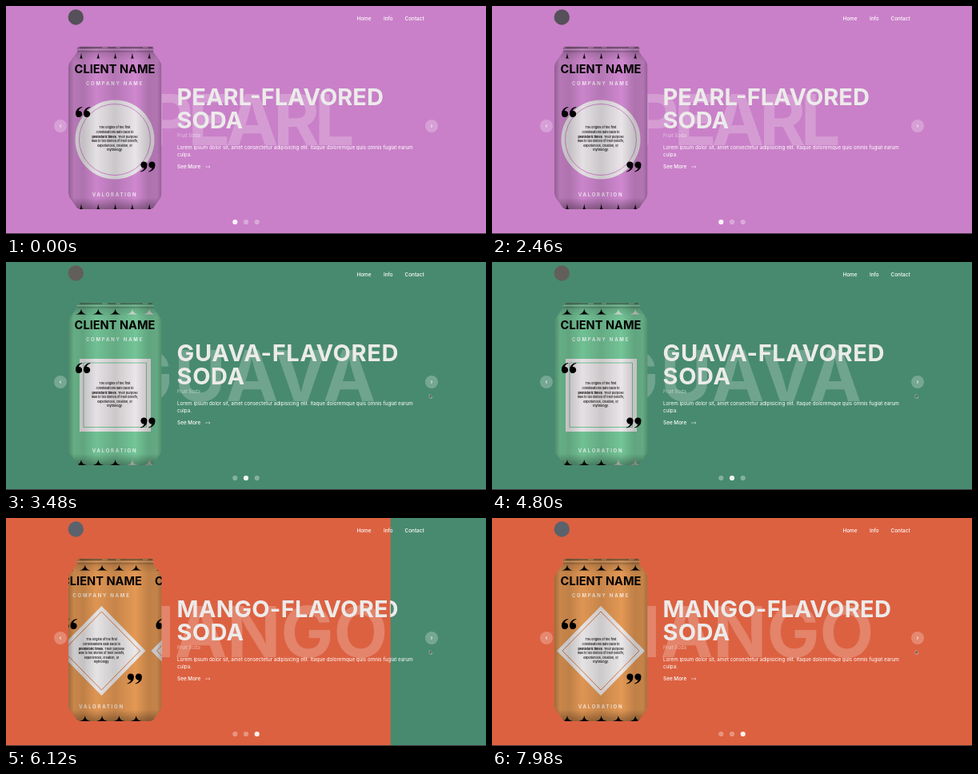
These frames come from a looping animation (600 by 285 pixels, 8 s). An HTML page:

```html
<!DOCTYPE html>
<html lang="en">
<head>
<meta charset="utf-8">
<title>Soda slider</title>
<style>
html, body { margin: 0; width: 100%; height: 100%; overflow: hidden; }
body { position: relative; font-family: Inter, sans-serif; }
svg { position: absolute; inset: 0; width: 100%; height: 100%; display: block; }
text { font-family: Inter, sans-serif; }
.slide { position: absolute; inset: 0; }
.slide, .slide .can, .slide .label, .dot, .cursor, .tip { animation: 8s linear infinite; }

.big { font-size: 88px; font-weight: 700; fill: #fff; opacity: .22; text-anchor: middle; }
.title { font-size: 29px; font-weight: 700; fill: #ecebea; }
.small { font-size: 6px; fill: #fff; opacity: .55; }
.copy { font-size: 6.25px; fill: #fff; }
.link { font-size: 6.4px; font-weight: 500; fill: #fff; }
.client { font-size: 14.6px; font-weight: 700; }
.caps { font-size: 6px; font-weight: 700; letter-spacing: 1.75px; fill: #fff; opacity: .8; }
.note { font-size: 3.68px; font-weight: 500; }
.label text { text-anchor: middle; }
.guava .title, .guava .big { letter-spacing: .022em; }
.mango .title { letter-spacing: .01em; }
.pearl .big { letter-spacing: -.07em; }

/* A slide wipes in from the left while the old can rolls to the right. */
.under { animation-name: appear; animation-timing-function: step-end; }
.under .can { animation-name: firstRoll; }
.under .label { animation-name: firstLabel; }
.guava { animation-name: firstWipe; }
.guava .can { animation-name: secondRoll; }
.guava .label { animation-name: guavaLabel; }
.over { animation-name: secondWipe; }
.over .label { animation-name: lastLabel; }

@keyframes appear { 0% { opacity: 0 } 35.64%, 100% { opacity: 1 } }
@keyframes firstWipe {
  0% { clip-path: inset(0 100% 0 0) }
  35.64% { clip-path: inset(0 100% 0 0); animation-timing-function: ease }
  43.14%, 100% { clip-path: inset(0 -1% 0 0) }
}
@keyframes secondWipe {
  0% { clip-path: inset(0 100% 0 0) }
  72.83% { clip-path: inset(0 100% 0 0); animation-timing-function: ease }
  80.33%, 100% { clip-path: inset(0 -1% 0 0) }
}
@keyframes firstRoll {
  0% { transform: translateX(0) }
  35.64% { transform: translateX(0); animation-timing-function: ease }
  43.14%, 100% { transform: translateX(100px) }
}
@keyframes secondRoll {
  0% { transform: translateX(0) }
  72.83% { transform: translateX(0); animation-timing-function: ease }
  80.33%, 100% { transform: translateX(100px) }
}
@keyframes firstLabel {
  0% { transform: translateX(-68px) }
  35.64% { transform: translateX(-68px); animation-timing-function: ease }
  43.14%, 100% { transform: translateX(-123px) }
}
@keyframes guavaLabel {
  0% { transform: translateX(-80px) }
  35.64% { transform: translateX(-80px); animation-timing-function: ease }
  43.14% { transform: translateX(0) }
  72.83% { transform: translateX(0); animation-timing-function: ease }
  80.33%, 100% { transform: translateX(-55px) }
}
@keyframes lastLabel {
  0% { transform: translateX(-80px) }
  72.83% { transform: translateX(-80px); animation-timing-function: ease }
  80.33%, 100% { transform: translateX(0) }
}

.dot { fill: #fff; animation-timing-function: step-end; }
.dot:nth-child(1) { animation-name: dotOne; }
.dot:nth-child(2) { animation-name: dotTwo; }
.dot:nth-child(3) { animation-name: dotThree; }
@keyframes dotOne { 0% { opacity: .92 } 35.64%, 100% { opacity: .33 } }
@keyframes dotTwo { 0% { opacity: .33 } 35.64% { opacity: .92 } 72.83%, 100% { opacity: .33 } }
@keyframes dotThree { 0% { opacity: .33 } 72.83%, 100% { opacity: .92 } }

.tip { animation-name: tip; animation-timing-function: step-end; }
@keyframes tip { 0% { opacity: 0 } 6% { opacity: 1 } 19.5%, 100% { opacity: 0 } }
.cursor { animation-name: cursor; }
@keyframes cursor {
  0%, 32.99% { transform: translate(524px, 172px); opacity: 0 }
  33% { transform: translate(524px, 172px); opacity: 1 }
  35%, 37% { transform: translate(531px, 154px); opacity: 1 }
  43%, 100% { transform: translate(529.5px, 165.5px); opacity: 1 }
}
</style>
</head>
<body>
<script>
const PERIOD = 117;
const CAN = `M91 50.5H183Q186 52 184 57L192 68Q194.5 71 194.5 76V234Q194.5 239 191 243L186 250
  Q184 254 180 254H93Q89 254 87 250L82 243Q78 239 78 234V76Q78 71 81 68L89 57Q87 52 91 50.5Z`;
const QUOTE = 'M3.5-6.5Q-4.5-5-4.5 2.4A4.1 4.1 0 1 0-.8-1.6Q0-4.5 4-5.7Z';

const flavors = {
  pearl: {
    bg: '#c980c8', can: '#cf88cf', logo: '#55505a', tooth: 2, light: 9,
    badge: c => `<circle cx="136" cy="167" r="49.5" fill="#e8e4e7"/>
      <circle cx="136" cy="167" r="44.5" fill="none" stroke="${c}"/>`
  },
  guava: {
    bg: '#488a70', can: '#74c598', logo: '#625f5b', tooth: 7, light: 3,
    badge: c => `<path d="M92 121H181V212H92Z" fill="#ebe6e9"/>
      <path d="M97 126H175.5V206.5H97Z" fill="none" stroke="${c}"/>`
  },
  mango: {
    bg: '#dc6141', can: '#e49955', logo: '#5b626b', tooth: 7, light: 9,
    badge: c => `<path d="M136 110L191 166L136 222L81 166Z" fill="#ebe8e9"/>
      <path d="M136 117L184 166L136 215L88 166Z" fill="none" stroke="#d47a45"/>`
  }
};

const text = (cls, x, y, words) => `<text class="${cls}" x="${x}" y="${y}">${words}</text>`;

function teeth({ tooth: w, light }, y) {
  return Array.from({ length: 5 }, (_, i) => {
    const x = 94 + i * 21.3;
    return `<path d="M${x} ${y}Q${x + .7} ${y + 6} ${x + w} ${y + 7}H${x - w}Q${x - .7} ${y + 6} ${x} ${y}Z"
      fill="${i >= light ? '#d8e0da' : '#000'}"/>`;
  }).join('');
}

function quoteMarks(x, y, turn) {
  return `<g transform="translate(${x} ${y}) rotate(${turn})">
    <path d="${QUOTE}" transform="translate(-5 0)"/><path d="${QUOTE}" transform="translate(5 0)"/></g>`;
}

function label(flavor) {
  const lines = ['The origins of the first', 'constellations date back to',
    '<tspan font-weight="700">prehistoric times.</tspan> Their purpose',
    'was to tell stories of their beliefs,', 'experiences, creation, or', 'mythology.'];
  return teeth(flavor, 58.5) + teeth(flavor, 247) + flavor.badge(flavor.can) +
    text('client', 136, 84, 'CLIENT NAME') +
    text('caps', 136, 98.7, 'COMPANY NAME') + text('caps', 136, 238, 'VALORATION') +
    lines.map((line, i) => text('note', 136, 153.3 + i * 5.6, line)).join('') +
    quoteMarks(96.5, 132.5, 0) + quoteMarks(177, 201, 180);
}

function slide(name, role = '') {
  const flavor = flavors[name], word = name.toUpperCase();
  const copies = [-1, 0, 1, 2].map(k => `<g transform="translate(${k * PERIOD} 0)">${label(flavor)}</g>`).join('');
  return `<div class="slide ${name} ${role}"><svg viewBox="0 0 600 285">
    <rect width="600" height="285" fill="${flavor.bg}"/>
    <circle cx="87.3" cy="14" r="9.7" fill="${flavor.logo}"/>
    ${text('big', 303, 174, word)}
    <g class="can" clip-path="url(#canShape)">
      <path d="${CAN}" fill="${flavor.can}"/>
      <g class="label">${copies}</g>
      <path d="${CAN}" fill="url(#shade)"/>
      <path d="${CAN}" fill="url(#ends)"/>
      <path d="M92 52H183" stroke="#222" stroke-width="1.5" stroke-dasharray="28 7 10 6" opacity=".45"/>
      <path d="M88 54.5H187" stroke="#fff" opacity=".25"/>
      <path d="M89 57H186" stroke="#222" stroke-width=".8" opacity=".4"/>
    </g>
    ${text('title', 213.5, 124, word + '-FLAVORED')}
    ${text('title', 213.5, 153, 'SODA')}
    ${text('small', 214, 164, 'Fruit Soda')}
    ${text('copy', 214, 179, 'Lorem ipsum dolor sit, amet consectetur adipisicing elit. Itaque doloremque quis omnis fugiat earum')}
    ${text('copy', 214, 188, 'culpa.')}
    ${text('link', 214, 203.3, 'See More')}
    <path d="M249 201H255M253.7 199.7L255 201L253.7 202.3" fill="none" stroke="#fff" stroke-width=".5"/>
  </svg></div>`;
}

const arrow = (x, turn) => `<g transform="translate(${x} 150) rotate(${turn})">
  <circle r="8" fill="#fff" opacity=".25"/>
  <path d="M-.8-1.6L.8 0L-.8 1.6" fill="none" stroke="#fff"/></g>`;

const controls = `<svg viewBox="0 0 600 285">
  <defs>
    <clipPath id="canShape"><path d="${CAN}"/></clipPath>
    <linearGradient id="shade">
      <stop offset="0" stop-opacity=".3"/>
      <stop offset=".06" stop-opacity=".12"/>
      <stop offset=".16" stop-opacity=".16"/>
      <stop offset=".3" stop-opacity=".02"/>
      <stop offset=".5" stop-opacity=".13"/>
      <stop offset=".72" stop-opacity="0"/>
      <stop offset=".86" stop-opacity=".16"/>
      <stop offset=".95" stop-opacity=".14"/>
      <stop offset="1" stop-opacity=".28"/>
    </linearGradient>
    <linearGradient id="ends" x2="0" y2="1">
      <stop offset="0" stop-opacity=".22"/>
      <stop offset=".09" stop-opacity="0"/>
      <stop offset=".93" stop-opacity="0"/>
      <stop offset="1" stop-opacity=".32"/>
    </linearGradient>
  </defs>
  ${text('link', 438.5, 17.6, 'Home')}${text('link', 472, 17.6, 'Info')}${text('link', 498.5, 17.6, 'Contact')}
  ${arrow(68, 180)}${arrow(532, 0)}
  <g>${[286.3, 300, 313.7].map(x => `<circle class="dot" cx="${x}" cy="270" r="3.1"/>`).join('')}</g>
  <rect y="284" width="600" height="1" fill="#3c3538"/>
  <g class="tip"><rect x="39" width="40" height="4" fill="#f4f4f4"/>
    <text x="43" y="2" font-size="4.2" fill="#444">Reload this page</text></g>
  <path class="cursor" d="M0 0V4.4L1.1 3.5L1.8 5L2.6 4.7L1.9 3.2H3.2Z" fill="#111" stroke="#fff" stroke-width=".5"/>
</svg>`;

document.body.innerHTML =
  slide('pearl') + slide('mango', 'under') + slide('guava') + slide('mango', 'over') + controls;
</script>
</body>
</html>
```
